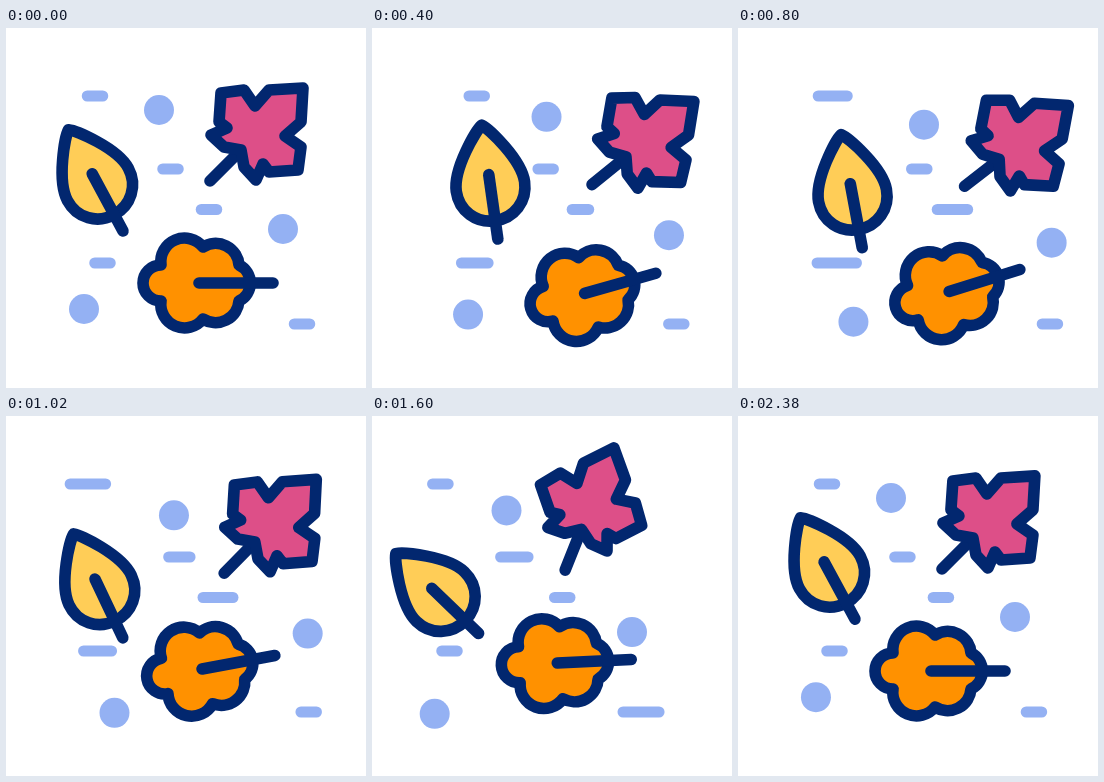
These frames come from a looping animation (360x360 px, 2400 ms). An HTML page:

```html
<!DOCTYPE html>
<html lang="en">
<head>
<meta charset="utf-8">
<title>Autumn leaves</title>
<style>
html, body { margin: 0; width: 100%; height: 100%; overflow: hidden; background: #fff; }
svg { display: block; width: 100vw; height: 100vh; }
.leaf { stroke: #02276f; stroke-width: 11.6; stroke-linecap: round; stroke-linejoin: round; }
.wind line { stroke: #94b1f3; stroke-width: 11; stroke-linecap: round; }
.wind circle { fill: #94b1f3; }
</style>
</head>
<body>
<svg viewBox="0 0 360 360">
  <g class="wind" id="wind"></g>
  <g class="leaf" id="yellow">
    <path fill="#ffcd57" d="M0-115C6-111 34.5-76 34.5-53C34.5-33 19-18.5 0-18.5C-19-18.5-34.5-33-34.5-53C-34.5-76-6-111 0-115Z"/>
    <path d="M0-65V0"/>
  </g>
  <g class="leaf" id="pink">
    <path d="M0 0L29-29"/>
    <polygon id="maple" fill="#dd4f88"/>
  </g>
  <g class="leaf" id="orange">
    <g transform="translate(-193 -255)">
      <path fill="#ff9100" d="M155 237A23.7 23.7 0 0 1 197 219A23.5 23.5 0 0 1 233 237A20 20 0 0 1 233 273A23.5 23.5 0 0 1 197 291A23.7 23.7 0 0 1 155 273A18 18 0 0 1 155 237Z"/>
      <path d="M193 255H267"/>
    </g>
  </g>
</svg>
<script>
const LOOP = 2400;
const $ = id => document.getElementById(id);
const set = (el, attrs) => {
  for (const key in attrs) el.setAttribute(key, attrs[key]);
};
const ease = u => u * u * (3 - 2 * u);
const mix = (a, b, u) => a + (b - a) * u;

// Eased swing: rest, blown right, blown left, then home again
function sway(t, [right, left, home], [rest, a, b]) {
  if (t < right) return mix(rest, a, ease(t / right));
  if (t < left) return mix(a, b, ease((t - right) / (left - right)));
  if (t < home) return mix(b, rest, ease((t - left) / (home - left)));
  return rest;
}

// Sinks from 0 to 1 at the low time and rises back by the home time
function sink(t, low, home) {
  const u = t < low ? t / low : Math.max(0, (home - t) / (home - low));
  return Math.sin(u * Math.PI / 2) ** 1.4;
}

// Smooth 0-1-0 bump
function bump(t, mid, half = 600) {
  const u = Math.min(1, Math.abs(t - mid) / half);
  return Math.cos(u * Math.PI / 2) ** 2;
}

function place(id, x, y, turn) {
  set($(id), { transform: `translate(${x} ${y}) rotate(${turn})` });
}

// Swing times plus the rest, right and left values of each channel
const yellow = { when: [560, 1470, LOOP], x: [117, 128, 106], turn: [-28.3, -3, -47] };
const pink = { when: [660, 1680, LOOP], x: [204, 228.4, 192.5], y: [153, 158.5, 154], turn: [0, 8.8, -23.8] };
const orange = { when: [580, 1350, 2000], x: [193, 218.5, 181.5], y: [255, 268.5, 243], turn: [0, -20.5, -4] };

const dots = [
  { when: [700, 1480, 2100], x: [153, 188.5, 132.5], y: 82, low: 1200 },
  { when: [760, 1600, 2250], x: [277, 314, 260], y: 201, low: 1300 },
  { when: [820, 1720, LOOP], x: [78, 115.5, 60], y: 281, low: 1400 }
];

// x is the middle; each dash stretches once around the time "mid"
const dashes = [
  { y: 68, when: [460, 1450, 2200], x: [89, 105.5, 66], mid: 1030, grow: 20 },
  { y: 141, when: [760, 1650, LOOP], x: [164.5, 181.5, 142], mid: 1380, grow: 17 },
  { y: 181.5, when: [830, 1900, LOOP], x: [203, 214.5, 184.5], mid: 900, grow: 16 },
  { y: 235, when: [500, 1600, 2250], x: [96.5, 103.5, 77.5], mid: 720, grow: 25 },
  { y: 296, when: [780, 1580, LOOP], x: [296, 312, 269], mid: 1700, grow: 22 }
];

// The maple leaf is mirrored across its diagonal stem
const half = [[93, -93], [91, -59], [75, -45], [91, -34], [88, -11], [59, -9],
  [53, -17], [46, -1], [34, -14], [31, -31]];
const mirrored = half.map(([x, y]) => [-y, -x]).reverse();
set($('maple'), { points: [...half, ...mirrored].join(' ') });

function add(name, attrs) {
  const el = document.createElementNS('http://www.w3.org/2000/svg', name);
  set(el, attrs);
  return $('wind').appendChild(el);
}
for (const d of dots) d.el = add('circle', { r: 15 });
for (const d of dashes) d.el = add('line', { y1: d.y, y2: d.y });

function draw(t) {
  place('yellow', sway(t, yellow.when, yellow.x), 203 + 19 * sink(t, 1100, LOOP),
    sway(t, yellow.when, yellow.turn));
  for (const [id, leaf] of [['pink', pink], ['orange', orange]]) {
    place(id, ...[leaf.x, leaf.y, leaf.turn].map(v => sway(t, leaf.when, v)));
  }
  for (const d of dots) {
    set(d.el, { cx: sway(t, d.when, d.x), cy: d.y + 18 * sink(t, d.low, d.when[2]) });
  }
  for (const d of dashes) {
    const mid = sway(t, d.when, d.x);
    const reach = (15.5 + d.grow * bump(t, d.mid)) / 2;
    set(d.el, { x1: mid - reach, x2: mid + reach });
  }
}

let start;
function tick(now) {
  start ??= now;
  draw(Math.max(0, now - start) % LOOP);
  requestAnimationFrame(tick);
}
draw(0);
requestAnimationFrame(tick);
</script>
</body>
</html>
```
